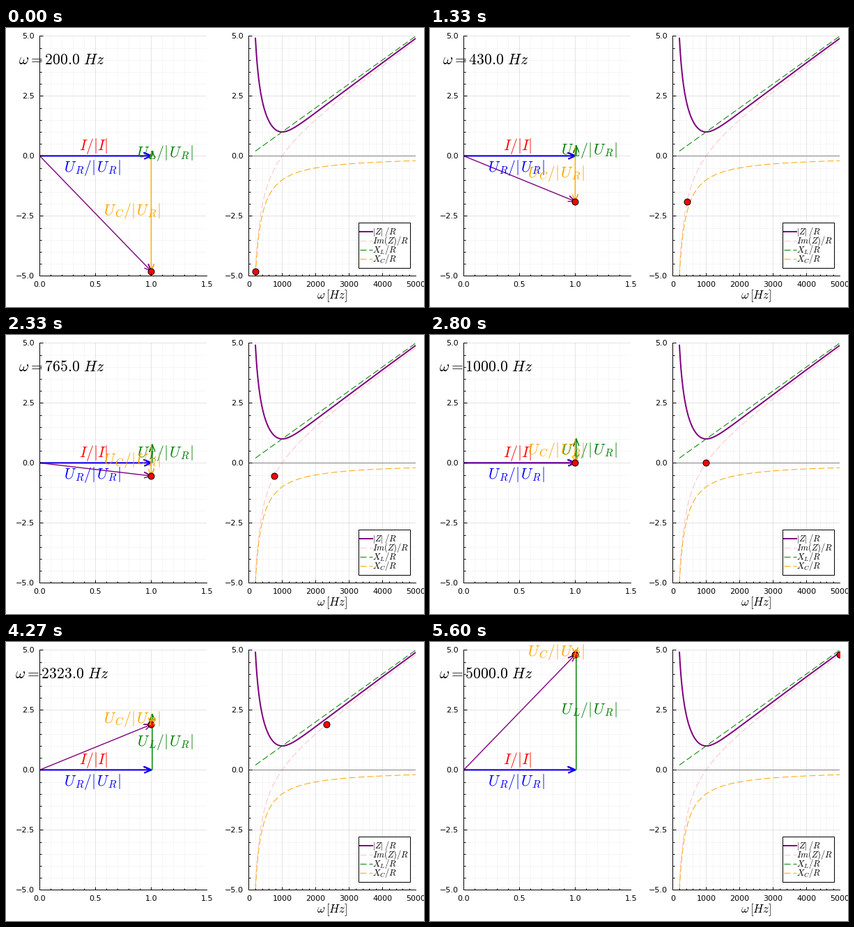
A matplotlib script that plays this animation: 600x400 px, repeating every 5.67 s.

```python
import numpy as np
import matplotlib.pyplot as plt
from matplotlib.animation import FuncAnimation
from matplotlib.patches import Rectangle

W, H, DPI = 600, 400, 100
STEP_MS, LOOP_MS = 30, 5670
STATES = 85                     # frequencies shown per loop, 15 a second
W0 = 1000                       # resonance frequency
PX = 72 / DPI                   # one pixel in points
AX_W, AX_H = 240, 344
AX_X, AX_BOTTOM = 48.4, 355.4   # left panel's origin, pixels from the top left

plt.rcParams.update({
    "font.family": "DejaVu Sans", "font.size": 8, "mathtext.fontset": "cm",
    "axes.linewidth": PX, "lines.scale_dashes": False,
})

fig = plt.figure(figsize=(W / DPI, H / DPI), dpi=DPI, facecolor="white")


def draw_ticks(ax, xs, ys, xmax, size, alpha):
    grid = dict(color="black", alpha=alpha, lw=0.5, zorder=0.5)
    ax.vlines(xs, -5, 5, **grid)
    ax.hlines(ys, 0, xmax, **grid)
    tick = dict(color="black", lw=PX, zorder=2.5)
    ax.vlines(xs, -5, -5 + size * 10 / AX_H, **tick)
    ax.hlines(ys, 0, size * xmax / AX_W, **tick)


def make_axes(left, xmax, xstep, decimals):
    ax = fig.add_axes([left / W, 1 - AX_BOTTOM / H, AX_W / W, AX_H / H])
    ax.spines[["top", "right"]].set_visible(False)
    xs = np.arange(0, xmax + xstep / 2, xstep)
    ys = np.arange(-5, 5.1, 2.5)
    draw_ticks(ax, np.arange(0, xmax + xstep / 10, xstep / 5),
               np.arange(-5, 5.1, 0.5), xmax, 2.1, 0.05)
    draw_ticks(ax, xs, ys, xmax, 4.1, 0.1)
    ax.set_xticks(xs, [f"{v:.{decimals}f}" for v in xs])
    ax.set_yticks(ys, [f"{v:.1f}".replace("-", "\u2212") for v in ys])
    ax.tick_params(length=0)
    ax.tick_params(axis="x", pad=8 * PX)
    ax.tick_params(axis="y", pad=7.5 * PX)
    ax.set(xlim=(0, xmax), ylim=(-5, 5))
    return ax


phasor = make_axes(AX_X, 1.5, 0.5, 1)
plot = make_axes(AX_X + 300, 5000, 1000, 0)


def reactance(w):
    return w / W0, -W0 / w


# Right panel: impedance curves
w = np.linspace(200, 5000, 1200)
xl, xc = reactance(w)
DASH = (0, (9 * PX, 4 * PX))
curves = [
    (np.hypot(1, xl + xc), "purple", 2, "-", r"$|Z|\,/R$"),
    (xl + xc, "pink", 1, DASH, r"$Im(Z)/R$"),
    (xl, "green", 1, DASH, r"$X_{L}/R$"),
    (xc, "orange", 1, DASH, r"$X_{C}/R$"),
]
for y, color, lw, style, _ in curves:
    plot.plot(w, y, color=color, lw=lw * PX, ls=style)
plot.axhline(0, color="gray", lw=PX)
fig.text(468 / W, 1 - 388.5 / H, r"$\omega\,[Hz]$", fontsize=12.2, ha="center")

# Legend
fig.add_artist(Rectangle((506.4 / W, 1 - 344.4 / H), 74 / W, 65 / H,
                         transform=fig.transFigure, fc="white", ec="black", lw=PX))
for i, (_, color, lw, style, name) in enumerate(curves):
    y = 1 - (292.4 + 13 * i) / H
    fig.add_artist(plt.Line2D([508 / W, 525.5 / W], [y, y], color=color,
                              lw=lw * PX, ls=style, transform=fig.transFigure))
    fig.text(525.7 / W, y - 3.2 / H, name, fontsize=9)


# Left panel: phasors
SCALE = np.array([AX_W / 1.5, AX_H / 10])


class Arrow:
    def __init__(self, color, lw=1.4, wing=4):
        self.wing = wing
        self.line, = phasor.plot([], [], color=color, lw=lw * PX, clip_on=False,
                                 solid_joinstyle="round", solid_capstyle="butt")

    def set(self, start, end):
        a, b = np.array(start) * SCALE, np.array(end) * SCALE
        d = (b - a) / np.hypot(*(b - a))
        side = self.wing * np.array([-d[1], d[0]])
        base = b - 10 * d
        pts = np.array([a, b, base + side, b, base - side])
        self.line.set_data(*(pts / SCALE).T)


def label(x_px, y, text, color="black"):
    return phasor.text((x_px - AX_X) / SCALE[0], y, text, color=color,
                       fontsize=15.6, ha="center", va="baseline")


def ratio(sub):
    gap = r"\hspace{0.1}"
    return rf"$U_{{{gap}{sub}}}/|{gap}U_{{{gap}R}}|$"


DROP = 5.2 / SCALE[1]           # from text centre to baseline

current = Arrow("red")
res = Arrow("blue", 2, 4.5)
ind = Arrow("green")
cap = Arrow("orange")
total = Arrow("purple")
current.set((0, 0), (1, 0))
res.set((0, 0), (1, 0))

label(125.3, 0.4 - DROP, r"$I/|I|$", "red")
label(124.5, -0.5 - DROP, ratio("R"), "blue")
ind_text = label(229, 0, ratio("L"), "green")
cap_text = label(180.5, 0, ratio("C"), "orange")
freq_text = label(80.2, 4 - 6.7 / SCALE[1], "")

DOT = dict(marker="o", ms=9 * PX, mfc="red", mec="black", mew=PX, ls="")
tip, = phasor.plot([], [], clip_on=False, **DOT)
probe, = plot.plot([], [], **DOT)


def update(i):
    # state reached by the end of this step, at 15 states a second
    k = (3 * (STEP_MS * i + 20) + 10) // 200
    w = round(200 * 25 ** (k / (STATES - 1)))
    xl, xc = reactance(w)
    im = xl + xc
    ind.set((1.01, 0), (1.01, xl))
    cap.set((1, xl), (1, im))
    total.set((0, 0), (1, im))
    tip.set_data([1], [im])
    probe.set_data([w], [im])
    ind_text.set_y(xl / 2 - DROP)
    cap_text.set_y(xl + xc / 2 - DROP)
    freq_text.set_text(rf"$\omega = {w:.1f}\ Hz$")
    return ()


anim = FuncAnimation(fig, update, frames=LOOP_MS // STEP_MS, interval=STEP_MS,
                     repeat=True, repeat_delay=0)
plt.show()
```
